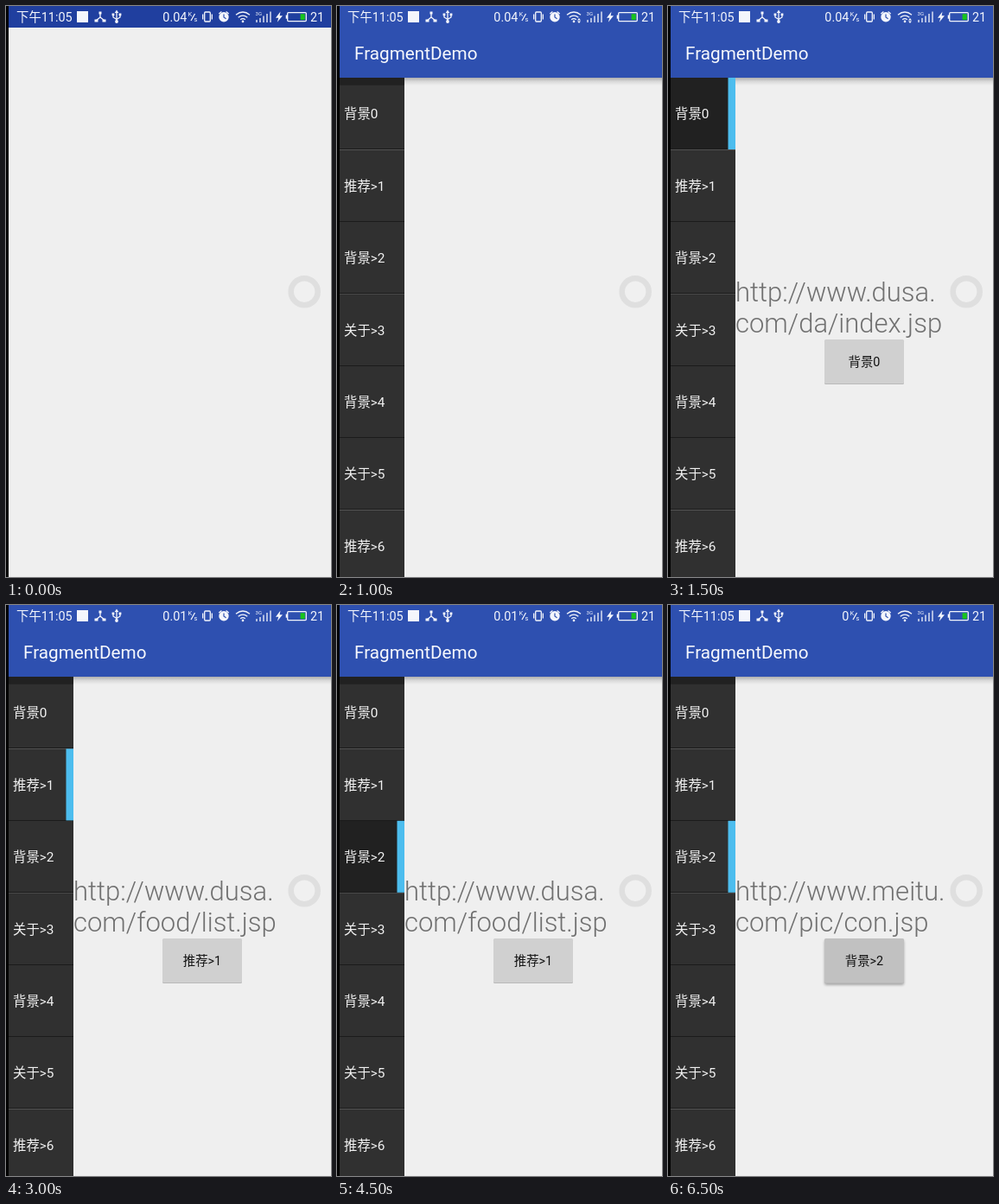
Write an HTML page that moves like this. It is 376 px wide and 661 px high and loops after 8000 ms.

```html
<!DOCTYPE html>
<html lang="zh-CN">
<head>
<meta charset="utf-8">
<title>FragmentDemo</title>
<style>
  html, body { margin: 0; width: 100%; height: 100%; overflow: hidden; background: #efefef; }
  svg { display: block; width: 376px; height: 661px; }
  text { font-family: Roboto, "Noto Sans CJK SC", "Noto Sans CJK", sans-serif; white-space: pre; }
  .status { font-size: 14.4px; fill: #f4f6fc; }
  .item { font-size: 15.4px; fill: #f2f2f2; }
  .url { font-size: 31px; font-weight: 300; fill: #707070; }
  .icon { fill: none; stroke: #f4f6fc; stroke-width: 1.3; }
  .solid { fill: #f4f6fc; }
</style>
</head>
<body>
<svg viewBox="0 0 376 661">
  <defs>
    <linearGradient id="fade" x2="0" y2="1">
      <stop offset="0" stop-color="#000" stop-opacity=".27"/>
      <stop offset=".5" stop-color="#000" stop-opacity=".09"/>
      <stop offset="1" stop-color="#000" stop-opacity="0"/>
    </linearGradient>
    <filter id="soft" x="-20%" y="-20%" width="140%" height="150%">
      <feGaussianBlur stdDeviation="1.6"/>
    </filter>
  </defs>
  <rect width="376" height="661" fill="#efefef"/>
  <rect id="bar" x="3" width="373" height="25"/>

  <g id="page">
    <rect x="3" y="25" width="373" height="58" fill="#2e50b0"/>
    <rect x="78" y="83" width="298" height="9" fill="url(#fade)"/>
    <text x="20" y="62" font-size="20.7" fill="#f6f8fd">FragmentDemo</text>
    <g id="menu"></g>
    <g id="content">
      <text class="url" x="78" y="342">http://www.<tspan id="host"></tspan></text>
      <text class="url" x="78" y="378" id="path"></text>
      <rect id="glow" x="181" y="388" width="92" height="52" rx="2" fill="#000" opacity=".3" filter="url(#soft)"/>
      <rect x="181" y="387" width="92" height="51" rx="1.5" fill="#b9b9b9"/>
      <rect id="button" x="181" y="386" width="92" height="51" rx="1.5"/>
      <text id="label" x="227" y="416.7" font-size="14.4" text-anchor="middle" fill="#111"></text>
    </g>
  </g>

  <circle cx="345.2" cy="330.7" r="15.5" fill="#f0f0f0" stroke="#dfdfdf" stroke-width="6.6"/>
  <rect width="3" height="661"/>

  <g id="status">
    <text class="status" x="12" y="17.6">下午11:05</text>
    <rect class="solid" x="82" y="6" width="13" height="13"/>
    <path class="icon" d="M109 7V13L104 17M109 13L114 17"/>
    <path class="solid" d="M107.5 6.5h3v3h-3zM102.5 15.5h4v3h-4zM111.5 15.5h4v3h-4z"/>
    <path class="icon" d="M128 7V18M124 10V13L128 15.5L132 13V10"/>
    <path class="solid" d="M128 4.5L130.3 8H125.7zM122.6 8.5h2.8v2.8h-2.8zM130.6 8.5h2.8v2.8h-2.8z"/>
    <circle class="solid" cx="128" cy="18" r="1.9"/>
    <text class="status" id="speed" x="209.4" y="17.6" text-anchor="end"></text>
    <g class="solid" font-size="7.5">
      <text x="210.6" y="12.2">K</text>
      <text x="217.6" y="18">s</text>
    </g>
    <path class="icon" stroke-width=".8" d="M214 17L218.5 9"/>
    <rect class="icon" x="229.7" y="7" width="6.6" height="11" rx="1"/>
    <path class="icon" d="M227.7 9.5V15.5M238.3 9.5V15.5"/>
    <circle class="solid" cx="252" cy="12.8" r="5.7"/>
    <path class="icon" d="M246.3 9L249.4 6.4M257.7 9L254.6 6.4"/>
    <path d="M252 9.5V13L254.6 14.7" fill="none" stroke="#2e50b0" stroke-width="1.2"/>
    <path class="icon" stroke-width="1.5" d="M266 10.3Q274 3.7 282 10.3M268.7 13.2Q274 9 279.3 13.2M271.2 15.8Q274 13.5 276.8 15.8"/>
    <circle class="solid" cx="274" cy="17.9" r="1.3"/>
    <path class="solid" id="traffic" d="M278 16.6L280 14L282 16.6zM278 17.4H282L280 20z"/>
    <text class="solid" x="288.6" y="10.8" font-size="6">3G</text>
    <path class="icon" d="M290 16V19M294 14V19M298 11.5V19M302 9V19M306 6.5V19"/>
    <path class="solid" d="M317.5 6.5L312 13.7H315.3L313.8 18.8L320 11.2H316.6z"/>
    <rect class="icon" x="325.7" y="7.6" width="21.6" height="10" rx="1"/>
    <path class="solid" d="M323.7 10.5h2v4.2h-2z"/>
    <rect x="340.6" y="9.2" width="5.2" height="6.9" fill="#18c41c"/>
    <text class="status" x="352" y="17.6">21</text>
  </g>
</svg>
<script>
const LOOP = 8000;
const $ = id => document.getElementById(id);
const rows = ['背景0', '推荐>1', '背景>2', '关于>3', '背景>4', '关于>5', '推荐>6'];
const rowY = i => 83 + 83.4 * i;

// [start, value] steps for each property
const steps = {
  open: [[0, false], [500, true]],
  traffic: [[0, false], [1000, true], [2000, false]],
  speed: [[0, '0.04'], [2500, '0.01'], [6500, '0']],
  selected: [[0, -1], [1500, 0], [3000, 1], [4500, 2]],
  pressed: [[0, -1], [1500, 0], [3000, -1], [4500, 2], [5500, -1]],
  shown: [[0, -1], [1500, 0], [3000, 1], [5500, 2]],
  held: [[0, false], [6500, true]]
};
const urls = [
  ['dusa.', 'com/da/index.jsp'],
  ['dusa.', 'com/food/list.jsp'],
  ['meitu.', 'com/pic/con.jsp']
];

function add(tag, attrs, text = '') {
  const el = document.createElementNS('http://www.w3.org/2000/svg', tag);
  for (const key in attrs) el.setAttribute(key, attrs[key]);
  el.textContent = text;
  return $('menu').appendChild(el);
}

const cells = rows.map((name, i) => {
  const y = rowY(i);
  const cell = add('rect', { x: 3, y, width: 75, height: 83.5 });
  add('text', { class: 'item', x: 8, y: y + 47.4 }, name);
  if (i) add('rect', { x: 3, y: Math.round(y) - 1, width: 75, height: 1, fill: '#1b1b1b' });
  return cell;
});
add('rect', { x: 3, y: 83, width: 75, height: 8.7, fill: '#212121' });
const marker = add('rect', { x: 69.5, width: 8.5, height: 83, fill: '#4dbdee' });

const at = (list, t) => list.filter(([start]) => start <= t).pop()[1];
const show = (el, on) => { el.style.display = on ? '' : 'none'; };
const write = (id, text) => { if ($(id).textContent !== text) $(id).textContent = text; };

function render(t) {
  const s = {};
  for (const key in steps) s[key] = at(steps[key], t);

  $('bar').setAttribute('fill', s.open ? '#2e50b0' : '#203f9f');
  show($('page'), s.open);
  show($('traffic'), s.traffic);
  write('speed', s.speed);

  cells.forEach((cell, i) => cell.setAttribute('fill', i === s.pressed ? '#212121' : '#303030'));
  show(marker, s.selected >= 0);
  marker.setAttribute('y', rowY(Math.max(0, s.selected)));

  show($('content'), s.shown >= 0);
  if (s.shown >= 0) {
    write('host', urls[s.shown][0]);
    write('path', urls[s.shown][1]);
    write('label', rows[s.shown]);
  }
  show($('glow'), s.held);
  $('button').setAttribute('fill', s.held ? '#c1c1c1' : '#d0d0d0');
}

const begin = performance.now();
function tick() {
  render((performance.now() - begin) % LOOP);
  requestAnimationFrame(tick);
}
tick();
</script>
</body>
</html>
```
